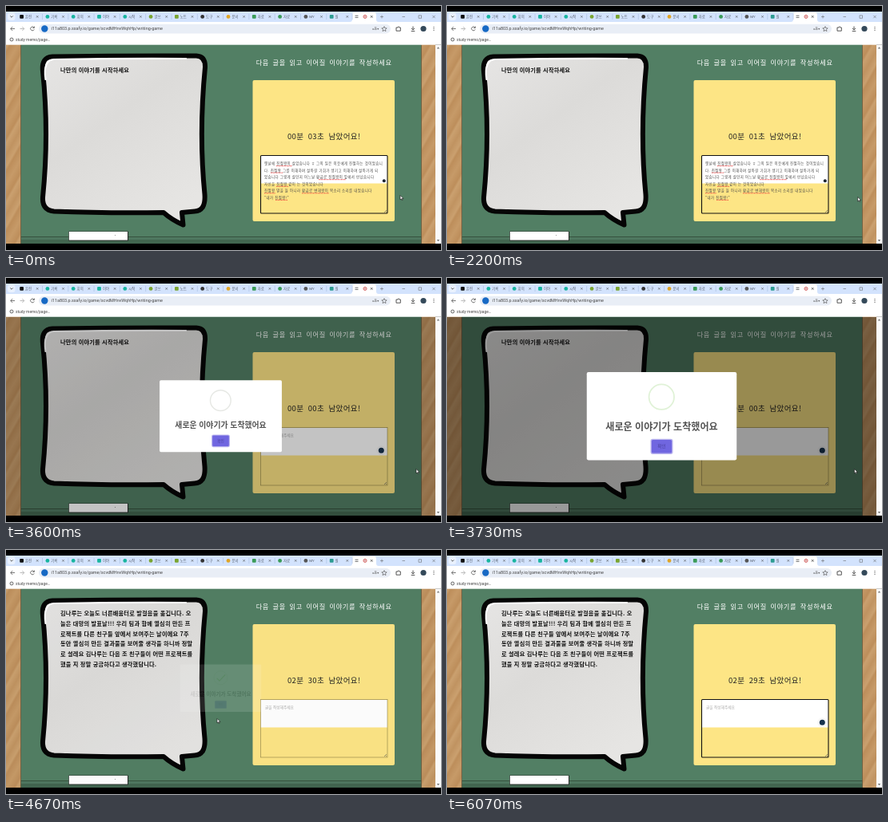
Animation, 544 px wide and 306 px high, one loop 6140 ms. Source, as an HTML page:

```html
<!DOCTYPE html>
<html lang="ko">
<head>
<meta charset="utf-8">
<style>
html, body { margin: 0; width: 100%; height: 100%; overflow: hidden; background: #000; }
svg { display: block; width: 100vw; height: 100vh; font-family: "Noto Sans CJK KR", "Noto Sans CJK", sans-serif; }
.ui { font-family: Roboto, "Noto Sans CJK KR", sans-serif; }
text { white-space: pre; }
</style>
</head>
<body>
<svg viewBox="0 0 544 306">
  <defs>
    <linearGradient id="wood" x2="16" y2="9" gradientUnits="userSpaceOnUse" spreadMethod="reflect">
      <stop offset="0" stop-color="#c69a68"/><stop offset=".45" stop-color="#bd8e5b"/>
      <stop offset=".6" stop-color="#caa06f"/><stop offset="1" stop-color="#c09361"/>
    </linearGradient>
    <linearGradient id="paper" x1="0" y1="0" x2=".7" y2="1">
      <stop offset="0" stop-color="#e6e5e4"/><stop offset=".45" stop-color="#dcdbd9"/><stop offset="1" stop-color="#e6e5e3"/>
    </linearGradient>
  </defs>

  <g id="page">
    <rect y="48" width="537" height="250" fill="url(#wood)"/>
    <rect x="18.5" y="48" width="501" height="250" fill="#527f64"/>
    <rect x="18.5" y="289" width="501" height="1.2" fill="#37533f"/>
    <rect x="18.5" y="290.2" width="501" height="2.8" fill="#4f7860"/>
    <rect x="18.5" y="293" width="501" height="5" fill="#426650"/>
    <path d="M18.5 49V298M519.5 49V298" stroke="#6b5438" stroke-width=".7"/>
    <rect x="78.3" y="282.6" width="74.6" height="11.8" fill="#222"/>
    <rect x="78.8" y="283" width="73.2" height="10.6" fill="#fff"/>
    <rect x="136" y="287" width="1" height="1" fill="#999"/>

    <path d="M58 63.5Q150 62 238 62.5Q249.5 63 249 77Q241 160 248.5 236Q250 257 236 257.5L220 259L221.5 274.5Q207 268 197 259Q125 260 60 257.5Q45 256 46 240Q54 160 46 82Q44 64 58 63.5Z"
      fill="url(#paper)" stroke="#050505" stroke-width="6" stroke-linejoin="round"/>
    <path d="M49.5 92Q46 68 60 67Q140 65.5 225 66" fill="none" stroke="#fff" stroke-width="2.2" stroke-linecap="round"/>
    <g id="story" font-size="7.2" letter-spacing=".2" font-weight="700" fill="#111"></g>

    <text x="397.7" y="74.2" text-anchor="middle" font-size="8.2" letter-spacing=".65" word-spacing="1.6" font-weight="500" fill="#fff">다음 글을 읽고 이어질 이야기를 작성하세요</text>
    <rect x="308.5" y="93" width="177.5" height="177" rx="2" fill="#fde585"/>
    <text id="clock" x="397.7" y="167.3" text-anchor="middle" font-size="9.5" letter-spacing=".4" word-spacing="2.2" font-weight="500" fill="#222"></text>

    <rect x="318.5" y="188" width="158.5" height="34.5" fill="#fff"/>
    <text id="hint" x="324" y="199" font-size="4.7" fill="#aaa">글을 작성해주세요</text>
    <g id="draft" font-size="4.4" letter-spacing=".45" fill="#444"></g>
    <rect id="box" x="318.5" y="187.5" width="158.5" height="72.5" fill="none"/>
    <path d="M473 259L476 256M475 259L476 258" stroke="#555" stroke-width=".6"/>
    <circle id="dot" cx="472.8" cy="219.2" r="2" fill="#1c2430"/>
    <g id="badge">
      <circle cx="469.3" cy="216.3" r="5.2" fill="#fff" stroke="#ddd" stroke-width=".5"/>
      <circle cx="469.3" cy="216.3" r="3.5" fill="#17324d"/>
    </g>
  </g>

  <rect id="shade" y="49" width="537" height="249" fill="#000"/>

  <g id="modal">
    <rect x="178" y="120" width="181" height="106.5" rx="2" fill="#fff"/>
    <circle id="ring" cx="268.3" cy="150" r="15.2" fill="none" stroke-width="1.7"/>
    <path id="check" d="M260.5 151.5L265.7 156.8L278 143.8" fill="none" stroke="#a5dc86" stroke-width="2.2" stroke-linecap="round" pathLength="1" stroke-dasharray="1 2"/>
    <text x="268.5" y="190.3" text-anchor="middle" font-size="11.7" font-weight="600" fill="#545454">새로운 이야기가 도착했어요</text>
    <rect x="255" y="200.7" width="27" height="18.6" rx="2.5" fill="#b9b3ee"/>
    <rect x="256.3" y="202" width="24.4" height="16" rx="1.5" fill="#7066e0"/>
    <text x="268.5" y="212" text-anchor="middle" font-size="5.5" fill="#4a429f">확인</text>
  </g>

  <g class="ui">
    <rect width="544" height="7" fill="#000"/>
    <rect y="7" width="544" height="15" fill="#d3e3fd"/>
    <rect y="20" width="544" height="28.7" fill="#fff"/>
    <path d="M430 20Q433 20 433 17V11Q433 8 436 8H460Q463 8 463 11V17Q463 20 466 20Z" fill="#fff"/>
    <rect x="2" y="8.5" width="9.5" height="9.5" rx="3" fill="#e9f1fe"/>
    <path d="M5.3 12.5L7 14.2L8.7 12.5" fill="none" stroke="#333" stroke-width=".8"/>
    <g id="tabs" font-size="4.4" fill="#5b6472"></g>
    <g fill="none" stroke="#555" stroke-width=".5">
      <path d="M468 13.5H472M470 11.5V15.5M495.5 13.5H499M516 11.8H519.5V15.3H516ZM533.3 11.8L536.7 15.2M536.7 11.8L533.3 15.2"/>
      <g stroke-width=".8">
        <path d="M11 28.5H6M8.2 26L5.7 28.5L8.2 31"/>
        <path d="M17.5 28.5H22.5M20.3 26L22.8 28.5L20.3 31" stroke="#aaa"/>
        <path d="M35 27A2.4 2.4 0 1 0 35.3 29.3M35.4 25.5V27.5H33.3"/>
      </g>
    </g>
    <rect x="41" y="22.7" width="440" height="11.8" rx="5.9" fill="#e9eef6"/>
    <circle cx="48.3" cy="28.5" r="4.2" fill="#1769c4"/>
    <text x="56.5" y="30.4" font-size="5.45" fill="#444">i11a803.p.ssafy.io/game/scvdMHnvWqhHp/writing-game</text>
    <text x="458" y="30" font-size="4" fill="#555">aあ▾</text>
    <path d="M473 25.6L473.9 27.7L476.2 27.9L474.5 29.4L475 31.6L473 30.4L471 31.6L471.5 29.4L469.8 27.9L472.1 27.7Z" fill="none" stroke="#444" stroke-width=".6"/>
    <path d="M488 27H490A1 1 0 0 1 492 27H493.3V31.2H488Z M509 25.5V29.5M507 28L509 30L511 28M506.7 31.5H511.3" fill="none" stroke="#444" stroke-width=".9"/>
    <circle cx="522" cy="28.5" r="3.6" fill="#34495a"/>
    <path d="M535 26V26.9M535 28.1V29M535 30.2V31.1" stroke="#333" stroke-width="1"/>
    <circle cx="7" cy="42" r="2" fill="none" stroke="#444" stroke-width=".8"/>
    <text x="12" y="43.7" font-size="4.9" fill="#444">study memo/page…</text>
    <rect x="537" y="48.7" width="7" height="249.3" fill="#fafafa"/>
    <path d="M538.8 53.5L540.5 51.3L542.2 53.5Z M538.8 293L540.5 295.2L542.2 293Z" fill="#777"/>
    <rect y="298" width="544" height="8" fill="#000"/>
  </g>

  <path id="mouse" d="M0 -2.5V3L1.3 1.8L2.2 3.7L3 3.3L2.2 1.5H4Z" fill="#fff" stroke="#111" stroke-width=".6"/>
</svg>
<script>
const LOOP = 6140, FRAME = 1000 / 15;
const OPEN = 3566, CLOSE = 4578, FOCUS = 5420;
const $ = id => document.getElementById(id);
const clamp = x => Math.max(0, Math.min(1, x));
const mix = (a, b, k) => a + (b - a) * k;
const span = (t, start, length) => clamp((t - start) / length);
const show = (id, on) => $(id).setAttribute("display", on ? "inline" : "none");
const set = (id, attrs) => { for (const k in attrs) $(id).setAttribute(k, attrs[k]); };

// CSS "ease": cubic-bezier(.25, .1, .25, 1)
function ease(x) {
  if (x <= 0 || x >= 1) return clamp(x);
  const curve = (a, b, u) => 3 * a * u * (1 - u) ** 2 + 3 * b * u * u * (1 - u) + u ** 3;
  let lo = 0, hi = 1;
  for (let i = 0; i < 20; i++) {
    const mid = (lo + hi) / 2;
    if (curve(.25, .25, mid) < x) lo = mid; else hi = mid;
  }
  return curve(.1, 1, lo);
}

// Piecewise eased or linear track over [time, value...] rows
function track(rows, t, curve = x => x) {
  let i = 0;
  while (i < rows.length - 2 && t >= rows[i + 1][0]) i++;
  const [a, b] = [rows[i], rows[i + 1]];
  const k = curve(span(t, a[0], b[0] - a[0]));
  return a.slice(1).map((v, j) => mix(v, b[j + 1], k));
}

const opening = ["나만의 이야기를 시작하세요"];
const story = [
  "김나루는 오늘도 너른배움터로 발걸음을 옮깁니다. 오",
  "늘은 대망의 발표날!!! 우리 팀과 함께 열심히 만든 프",
  "로젝트를 다른 친구들 앞에서 보여주는 날이에요 7주",
  "동안 열심히 만든 결과물을 보여줄 생각을 하니까 정말",
  "로 설레요 김나루는 다음 조 친구들이 어떤 프로젝트를",
  "했을 지 정말 궁금하다고 생각했답니다."
];
const draft = [
  "옛날에 친절왕이 살았습니다 ㅎ 그의 일은 이웃에게 친절하는 것이었습니",
  "다. 친절왕 그를 이해하며 살아갈 기회가 생기고 이해하며 살아가게 되",
  "었습니다 그렇게 살던지 어느날 황금로 친절왕이 앞에서 만났습니다",
  "자신을 친절왕 같이 는 것이었습니다",
  "친절왕 말을 들 아니라 황금로 변해왕이 목소리 소리를 내었습니다",
  "\"내가 친절왕!\""
];
const squiggles = [[338, 20, 0], [331, 15, 1], [391, 34, 2], [338, 15, 3], [323, 14, 4], [370, 34, 4], [337, 15, 5]];

const lines = (rows, x, y, step) =>
  rows.map((s, i) => `<text x="${x}" y="${y + i * step}">${s}</text>`).join("");
const pages = [lines(opening, 68, 82.5, 12.7), lines(story, 68, 82.2, 12.7)];

$("draft").innerHTML = lines(draft, 323, 199.2, 8.55) + squiggles.map(([x, w, row]) =>
  `<path d="M${x} ${200.6 + row * 8.55}h${w}" stroke="#e33" stroke-width=".8" stroke-dasharray="1 .4"/>`).join("");

const tabColors = ["#111", "#18b5a0", "#18b5a0", "#18b5a0", "#18b5a0", "#7aa531", "#7aa531", "#333", "#e0a526", "#3a9b58", "#3a9b58", "#555", "#2d9c92"];
const tabNames = ["훈련", "기록", "회의", "이야", "시작", "글쓰", "노트", "도구", "문서", "자료", "자료", "MY", "원"];
$("tabs").innerHTML = tabColors.map((c, i) => {
  const x = 19.5 + i * 32.3;
  return `<rect x="${x - 2.3}" y="11" width="4.8" height="4.8" rx="${i % 3 ? 2.4 : 1}" fill="${c}"/>
    <text x="${x + 4.5}" y="15.2">${tabNames[i]}</text>
    <path d="M${x + 18.5} 12.2l2.4 2.4m0 -2.4l-2.4 2.4" stroke="#444" stroke-width=".6"/>
    <path d="M${x + 26} 10v7" stroke="#a6bddf" stroke-width=".6"/>`;
}).join("") + `<path d="M436.5 12.2h4M436.5 14.4h4M455.8 12l2.8 2.8m0 -2.8l-2.8 2.8" stroke="#333" stroke-width=".7"/>
  <circle cx="449" cy="13.4" r="2" fill="none" stroke="#c44" stroke-width=".9"/><circle cx="449" cy="13.4" r=".7" fill="#a33"/>`;

const pointer = [
  [0, 493, 240], [270, 494, 241], [670, 514, 247], [1200, 514, 247], [1600, 514, 242], [3600, 513, 242],
  [3750, 505, 242], [4200, 306, 235], [4470, 266, 213], [4670, 264, 214], [4950, 275, 214], [5400, 400, 206]
];
const pop = [[0, .7], [135, 1.05], [240, .95], [300, 1]];

function clockText(t) {
  const left = t < OPEN - 3000 ? 3 : t < OPEN - 2000 ? 2 : t < OPEN - 1000 ? 1
    : t < CLOSE ? 0 : t < CLOSE + 1000 ? 150 : 149;
  const two = n => String(n).padStart(2, "0");
  return `${two(Math.floor(left / 60))}분 ${two(left % 60)}초 남았어요!`;
}

let shownPage = -1;
function draw(t) {
  const opened = t >= OPEN, closing = t >= CLOSE;
  const page = closing ? 1 : 0;
  if (page !== shownPage) $("story").innerHTML = pages[shownPage = page];
  $("clock").textContent = clockText(t);

  const focused = !opened || t >= FOCUS;
  show("draft", !opened);
  show("dot", !opened);
  show("hint", opened);
  show("badge", t >= FOCUS || (opened && t < OPEN + 200));
  set("box", focused
    ? { stroke: "#111", "stroke-width": 1.1, rx: 1 }
    : { stroke: "#8b7d45", "stroke-width": .6, rx: 0 });

  const shade = .4 * (ease(span(t, OPEN, 100)) - ease(span(t, CLOSE, 120)));
  set("shade", { opacity: shade });

  const out = ease(span(t, CLOSE, 150));
  const scale = closing ? mix(1, .5, out) : track(pop, t - OPEN, ease)[0];
  show("modal", opened && out < 1);
  set("modal", {
    opacity: 1 - out,
    transform: `translate(268.5 173.3) scale(${scale}) translate(-268.5 -173.3)`
  });
  set("ring", { stroke: t < OPEN + 100 ? "#e6e8e4" : "#e0f2d7" });
  const drawn = span(t, OPEN + 120, 400);
  show("check", drawn > 0);
  set("check", { "stroke-dashoffset": 1 - drawn });

  const [x, y] = track(pointer, t);
  show("mouse", t < FOCUS - 60);
  set("mouse", { transform: `translate(${x} ${y})` });
}

const start = performance.now();
function tick() {
  const t = (performance.now() - start) % LOOP;
  draw(Math.floor(t / FRAME + .01) * FRAME);
  requestAnimationFrame(tick);
}
draw(0);
tick();
</script>
</body>
</html>
```
